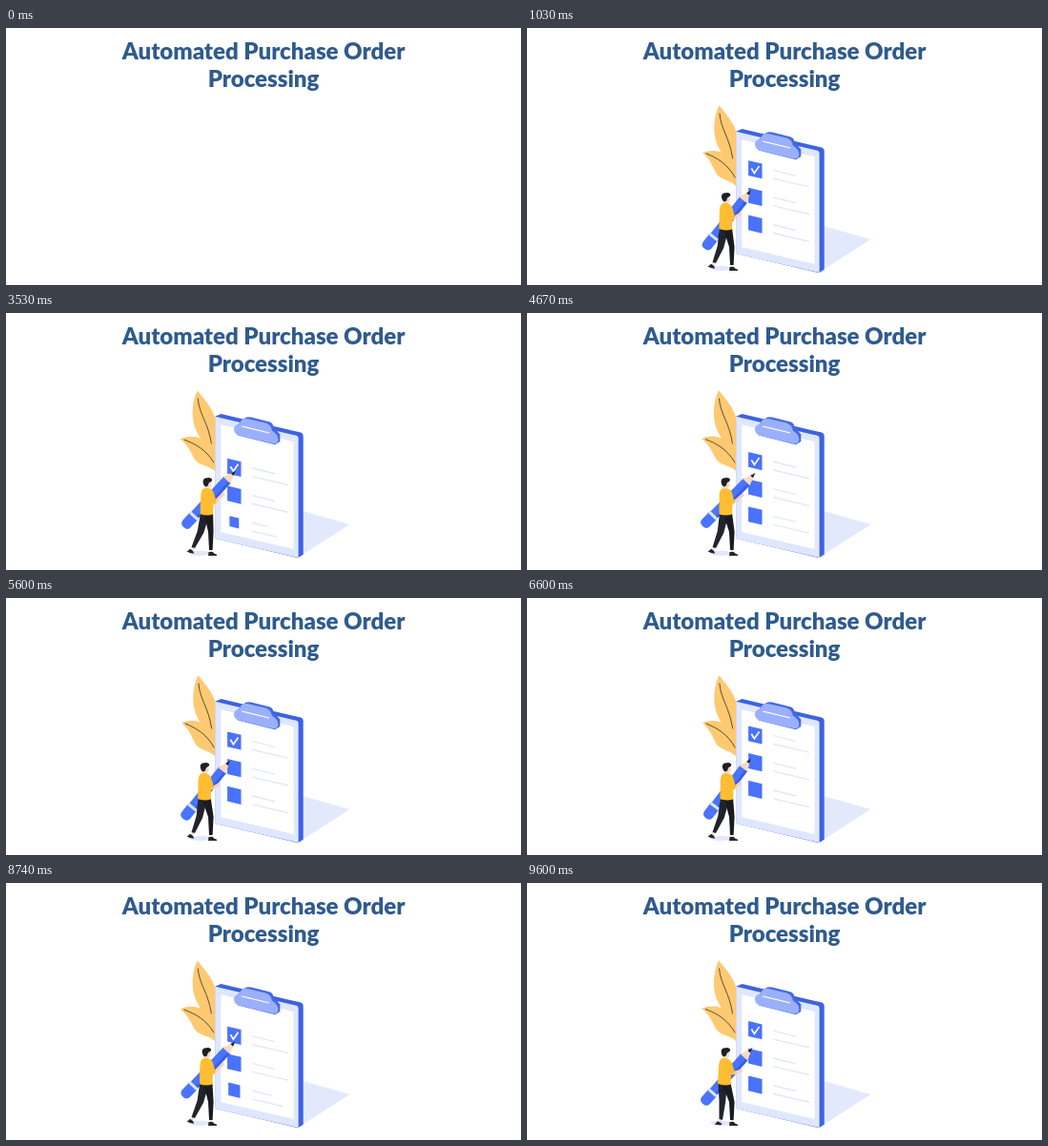
Write an HTML page that moves like this. It is 540 px wide and 270 px high and loops after 9670 ms.

```html
<!DOCTYPE html>
<html lang="en">
<head>
<meta charset="utf-8">
<title>Automated Purchase Order Processing</title>
<style>
  html, body { margin: 0; width: 100%; height: 100%; overflow: hidden; background: #fff; }
  .stage { position: relative; width: 540px; height: 270px; overflow: hidden; }
  h1 {
    position: absolute; left: 0; top: 9px; width: 540px; margin: 0;
    font: 900 24px/29px Lato, sans-serif; color: #2f5b8f; text-align: center;
  }
  svg { position: absolute; left: 0; top: 0; }
  .vein { fill: none; stroke: #454139; stroke-width: .9; stroke-linecap: round; }
  .row { fill: none; stroke: #dfe4f5; stroke-width: 1.2; }
  .tick { fill: none; stroke: #fff; stroke-width: 1.7; }
  .limb { fill: none; stroke-linecap: round; stroke-linejoin: round; }
</style>
</head>
<body>
<div class="stage">
  <h1>Automated Purchase Order<br>Processing</h1>
  <svg width="540" height="270" viewBox="0 0 540 270">
    <g id="scene" visibility="hidden">
      <path d="M311 208L360.5 222L306 257Z" fill="#e3e9fd"/>

      <g id="tall">
        <path d="M201.2 81.3C196.5 90 194 106 198 119C202 132 212 139 219 165L221 118C219 101 210 93 201.2 81.3Z" fill="#fec970"/>
        <path class="vein" d="M201.6 90C203 107 212 114 215.5 137"/>
      </g>
      <g id="low">
        <path d="M183.5 131.7C193 127.5 204 129 211 136C217 142 219 151 220 167C214 159.5 202 161 197.5 152C194 145 191 138 183.5 131.7Z" fill="#fec970"/>
        <path class="vein" d="M187.5 132.5C199 137 210 143 218 157"/>
      </g>

      <path d="M219.5 108.5L225.5 106L309 125.6Q311.7 126.3 311.7 129V253.8L306 257.2L219.5 237Z" fill="#3d63e2"/>
      <path d="M219.2 108.8L304.5 128.8Q306.6 129.4 306.6 131.5V257L219.2 237Z" fill="#dfe7fe"/>
      <path d="M225.3 117.3L301.6 135.2V248L225.3 230.2Z" fill="#fff"/>

      <g id="list"></g>

      <path d="M243 117.5L250 110.8Q252 108.5 257 109.6L276 114.2Q280 115.3 280.5 120L287.3 127.5V135L282 138.3L243 128.6Z" fill="#4469e6"/>
      <path d="M239 121.5Q239.5 117.3 245 116.5Q246 110.5 252.5 111L272 115.6Q277.8 117.2 278.8 123.6Q285.6 128 285.4 133Q285 138 279.5 137L244.5 128.8Q238.5 127 239 121.5Z" fill="#9bb0fd"/>
      <path d="M247 119L276 126" stroke="#fff" stroke-width="1.1"/>

      <ellipse cx="203" cy="252.3" rx="10.5" ry="2.6" fill="#e1e8fe"/>

      <g id="pencil">
        <path d="M5 -5H62V5H5Z" fill="#4a74fd"/>
        <path d="M5 2H62V5H5Z" fill="#3a61e4"/>
        <path d="M12 -5.6H1Q-4 -5.6 -4 0Q-4 5.6 1 5.6H12Z" fill="#4a74fd"/>
        <path d="M10 -5.4H13V5.4H10Z" fill="#dce5ff"/>
        <path d="M61 -5L74 0L61 5Z" fill="#fbd9c3"/>
        <path d="M69 -1.9L74.5 0L69 1.9Z" fill="#20232c"/>
      </g>

      <path id="backAnkle" class="limb" stroke="#fbd5c4" stroke-width="2.4"/>
      <path id="frontAnkle" class="limb" stroke="#fbd5c4" stroke-width="2.4"/>
      <path id="backLeg" fill="#22242b"/>
      <path id="frontLeg" fill="#191b21"/>
      <path id="backShoe" d="M-2 -1.8L1.5 -.3L3.2 2.1Q-2 2.6 -5 1.2Q-3 .8 -2 -1.8Z" fill="#24262d"/>
      <path id="frontShoe" d="M-2.5 -1.5L1.8 -1.5Q3 .8 6 1.3V2.4H-3Z" fill="#24262d"/>

      <g id="torso">
        <path d="M-2.5 181H2.5V187H-2.5Z" fill="#fbd5c4"/>
        <path d="M-3.5 184.5Q1 183.4 4.5 185.5Q8 188 7.2 195L6.6 211.5Q0 213.5 -7 211.3L-6.6 193Q-6.5 186 -3.5 184.5Z" fill="#ffbd31"/>
        <path d="M-2 178L4 177.2L4.5 181.4Q3 184.4 -.5 183Z" fill="#fbd5c4"/>
        <path d="M-4.4 178Q-5 173.2 0 173.2Q2.5 172.4 4.8 174.3Q5.6 177.2 2.4 177.8Q1.2 179 .8 181.5L-1.5 182.5Q-4 181.5 -4.4 178Z" fill="#1d1f26"/>
      </g>
      <path id="forearm" class="limb" stroke="#fbd0bd" stroke-width="3"/>
      <path id="sleeve" class="limb" stroke="#ffbd31" stroke-width="5"/>
    </g>
  </svg>
</div>

<script>
const LOOP = 9670, BLANK = 100, CYCLE = 4.785, FPS = 14, GAP = 28.7;
const $ = id => document.getElementById(id);
const set = (id, name, value) => $(id).setAttribute(name, value);
const clamp = x => Math.max(0, Math.min(1, x));
const ramp = (t, a, b) => clamp((t - a) / (b - a));

// Poses: time, head x, hip x, rear foot x, pencil tip, pencil end
const poses = [
  [0, 208, 207, 202, 236, 173, 187, 229],
  [.6, 208, 208, 195, 235, 171, 188, 229],
  [1.715, 209.3, 209.5, 195, 235, 168.5, 190, 228],
  [1.93, 211, 211, 195, 236, 169, 191.5, 229],
  [2.5, 210.5, 211, 195, 238, 172, 193, 229],
  [3.005, 210, 211, 195, 241.5, 166.5, 194, 224],
  [3.43, 211, 210.5, 195, 241, 165.5, 189, 222],
  [4.57, 208, 208.5, 195, 239.5, 168, 187, 221],
  [4.715, 208, 207, 202, 236.5, 173, 187, 229],
  [CYCLE, 208, 207, 202, 236, 173, 187, 229]
];

function poseAt(t) {
  let i = 1;
  while (i < poses.length - 1 && poses[i][0] < t) i++;
  const a = poses[i - 1], b = poses[i], k = ramp(t, a[0], b[0]);
  return a.map((v, j) => v + (b[j] - v) * k);
}

const items = [-1, 0, 1, 2].map(slot => {
  const g = document.createElementNS('http://www.w3.org/2000/svg', 'g');
  g.innerHTML = `<path class="box" d="M-7.2 -9.6L7.2 -6.2V9.6L-7.2 6.2Z" fill="#4a72fd"/>
    <path class="tick" pathLength="1" stroke-dasharray="1 2" d="M-4 -1.2L-.9 3.8L4.2 -3.6"/>
    <path class="row"/>`;
  $('list').append(g);
  const [box, tick, row] = g.children;
  return { slot, g, box, tick, row };
});

function drawList(t) {
  const y = 183 - GAP * t / CYCLE;
  for (const { slot, g, box, tick, row } of items) {
    const size = slot === 2 ? ramp(t, 1.95, 4.1) : 1;
    const done = slot < 0 ? 1 : slot === 0 ? ramp(t, 2.1, 2.95) : 0;
    const a = 24 * size, b = 38 * size;
    g.setAttribute('transform', `translate(239.3 ${y + slot * GAP})`);
    g.setAttribute('opacity', slot < 0 ? 1 - ramp(t, 2.85, 3.35) : 1);
    box.setAttribute('transform', `scale(${size})`);
    tick.setAttribute('stroke-dashoffset', 1 - done);
    tick.setAttribute('visibility', done ? 'inherit' : 'hidden');
    row.setAttribute('d', `M18.7 .5l${a} ${a * .25}M18.7 9.3l${b} ${b * .235}`);
    row.setAttribute('visibility', size ? 'inherit' : 'hidden');
  }
}

function drawMan(t) {
  const [, head, hip, foot, tx, ty, ex, ey] = poseAt(t);
  const angle = Math.atan2(ty - ey, tx - ex) * 180 / Math.PI;
  const scale = Math.hypot(tx - ex, ty - ey) / 74.5;
  set('pencil', 'transform', `translate(${ex} ${ey}) rotate(${angle}) scale(${scale} 1)`);

  const lean = Math.atan((head - hip) / 32) * 180 / Math.PI;
  set('torso', 'transform', `translate(${hip} 0) rotate(${lean} 0 211)`);

  const step = (foot - 195) / 7, fy = 247 + step * 2;
  const kx = (hip + foot) / 2 + 1 - step, front = 215;
  set('backLeg', 'd', `M${hip - 6.5} 210L${hip + 3} 211L${kx + 3.5} 231L${foot + 3} ${fy}L${foot - .5} ${fy - 1}L${kx - 3} 229Z`);
  set('frontLeg', 'd', `M${hip - 3} 210L${hip + 6.6} 210.5L${front + 2.6} 230L${front + 1.6} 249H${front - 2}L${front - 3} 230Z`);
  set('backAnkle', 'd', `M${foot + 1} ${fy - 1}L${foot} ${fy + 2.5}`);
  set('frontAnkle', 'd', `M${front} 248v4`);
  set('backShoe', 'transform', `translate(${foot - .5} ${fy + 3}) rotate(${12 * (1 - step)})`);
  set('frontShoe', 'transform', `translate(${front} 252.5)`);

  const sx = head + 4.5, hx = ex + (tx - ex) * .75, hy = ey + (ty - ey) * .62 + 3;
  const jx = sx + 3, jy = 200;
  set('sleeve', 'd', `M${sx} 190L${jx - .5} ${jy - 2}`);
  set('forearm', 'd', `M${jx} ${jy}L${hx} ${hy}`);
}

function drawLeaves(t) {
  const wave = Math.sin(t / CYCLE * 2 * Math.PI);
  set('tall', 'transform', `rotate(${wave * .3} 219 165)`);
  set('low', 'transform', `rotate(${wave * 1.2} 219 165)`);
}

const start = performance.now();
function render(now) {
  const ms = Math.max(0, now - start) % LOOP;
  set('scene', 'visibility', ms < BLANK ? 'hidden' : 'visible');
  if (ms >= BLANK) {
    const t = Math.floor((ms - BLANK) * FPS / 1000 + .01) / FPS % CYCLE;
    drawList(t);
    drawLeaves(t);
    drawMan(t);
  }
  requestAnimationFrame(render);
}
render(start);
</script>
</body>
</html>
```
